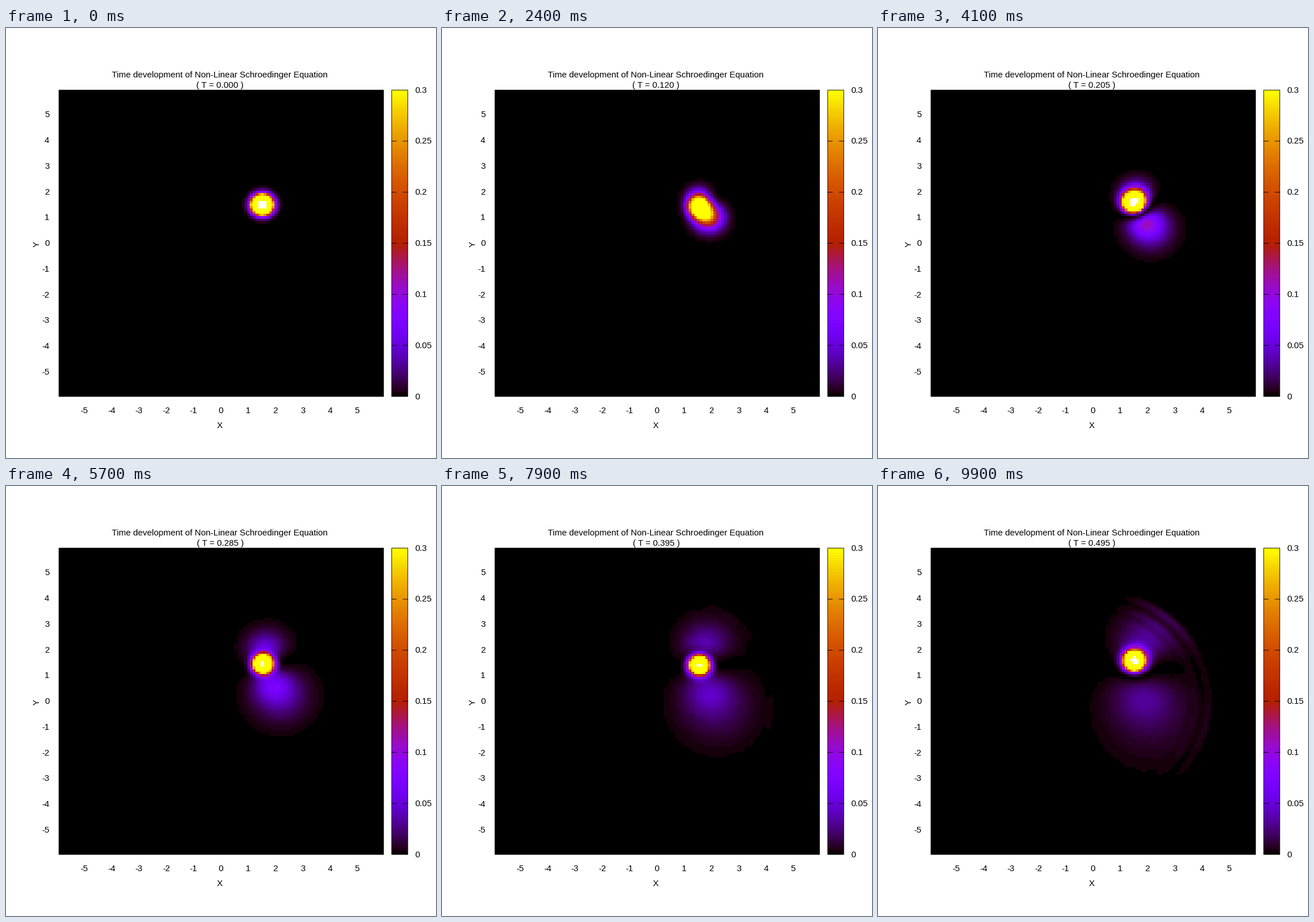
Write a matplotlib script that moves like this. It is 748x748 px and loops after 10 s.

```python
import numpy as np
import matplotlib.pyplot as plt
from matplotlib.animation import FuncAnimation
from matplotlib.patches import Rectangle

SIZE, DPI = 748, 100
FRAMES, DT = 100, 0.005
L, R, TOP, BOT = 92.1, 656.8, 108, 641  # map box
CL, CR = 670.9, 698.9                   # colour bar
HALF, VMAX, CLIP, LEVELS = 5.95, 0.3, 1.0, 128
WALL, K_WALL = 4.45, 6.5                # circular wall, fringe wave number
START = 1.5                             # packet starts at (START, START)
LINE = 0.67

plt.rcParams["font.family"] = "Liberation Sans"

grid = np.linspace(-HALF, HALF, 120)
X, Y = np.meshgrid(grid, grid)
RAD = np.hypot(X, Y)


def palette(v):
    """Black-violet-red-yellow map in discrete levels."""
    i = np.clip(np.floor(np.asarray(v) / VMAX * LEVELS), 0, LEVELS - 1)
    x = i / (LEVELS - 1)
    blue = np.clip(np.sin(2 * np.pi * x), 0, 1)
    return np.stack([np.sqrt(x), x ** 3, blue], axis=-1)


def packet(amp, cx, cy, s2):
    return amp * np.exp(-((X - cx) ** 2 + (Y - cy) ** 2) / (2 * s2))


def lobe(t, dx, dy, mass, rate, wake, wake_rate, lag):
    """Spreading packet displaced by (dx, dy), plus a narrower wake behind it."""
    s2 = 0.08 + rate * t * t
    amp = np.sqrt(mass / (np.pi * s2))
    return (packet(amp, START + dx, START + dy, s2)
            + packet(amp * wake, START + lag * dx, START + lag * dy,
                     0.08 + wake_rate * t * t))


def density(t):
    phase = 21.7 * (t - 0.205)

    # trapped part, wobbling in its well
    settle = 1 - np.exp(-t / 0.05)
    dip = np.exp(-((t - 0.1) / 0.045) ** 2)
    sway = np.cos(phase)
    core = packet(1.16 - 0.35 * dip,
                  START + settle * (0.025 - 0.025 * sway),
                  START + settle * (-0.025 + 0.075 * sway),
                  0.08 + 0.035 * dip)

    # escaping part circling the origin, and an upper lobe of opposite sign
    a = np.radians(45 - t * (158 - 70 * t))
    r = START * np.sqrt(2) * (1 + 0.1 * t)
    down = lobe(t, r * np.cos(a) - START, r * np.sin(a) - START,
                0.1, 10.5, 0.6 + t, 3, 0.45)
    up = lobe(t, 2.2 * t * t, 1.8 * t, 0.06, 5.3, 2 * t, 2, 0.5)
    twist = np.exp(1.5j * np.maximum(RAD - 3, 0))
    out = up - down * twist

    # reflection from the wall
    gap = np.maximum(WALL - RAD, 0)
    back = 0.8 * np.exp(-gap / max(0.05, 2.2 * (t - 0.3)))
    out = out * (RAD < WALL) * (1 - back * np.exp(2j * K_WALL * gap))
    return np.abs(core + out * np.exp(1j * phase)) ** 2


def cell_colors(t):
    d = density(t)
    corners = np.stack([d[:-1, :-1], d[1:, :-1], d[:-1, 1:], d[1:, 1:]])
    rgb = palette(corners.mean(axis=0))
    rgb[corners.min(axis=0) > CLIP] = 1
    return rgb


fig = plt.figure(figsize=(SIZE / DPI, SIZE / DPI), dpi=DPI, facecolor="white")
ax = fig.add_axes([0, 0, 1, 1])


def label(x, y, s, ha="center", va="baseline", **kw):
    return ax.text(x, y, s, ha=ha, va=va, fontsize=10.8, color="black", **kw)


def show(rgb, x0, x1):
    """Image with a soft one-pixel border."""
    ax.add_patch(Rectangle((x0, TOP), x1 - x0, BOT - TOP, fill=False,
                           ec="black", lw=LINE, snap=False, zorder=3))
    return ax.imshow(rgb, extent=(x0, x1, BOT, TOP), origin="lower",
                     interpolation="nearest", aspect="auto")


field = show(cell_colors(0), L, R)
show(palette((np.arange(LEVELS) + 0.5) / LEVELS * VMAX)[:, None, :], CL, CR)

mid_x, mid_y = (L + R) / 2, (TOP + BOT) / 2
for n in range(-5, 6):
    label(mid_x - 0.7 + n * (R - L) / (2 * HALF), 670.5, str(n))
    label(75.5, mid_y + 4.6 - n * (BOT - TOP) / (2 * HALF), str(n), "right")

for n in range(7):
    v = n * 0.05
    y = BOT - (BOT - TOP) * v / VMAX
    label(711.5, y + 4.6, f"{v:.2g}", "left")
    if 0 < n < 6:
        for x in (CL, CR - 8):
            ax.plot([x, x + 8], [y, y], color="black", lw=LINE, snap=False)

label(371.5, 85.7, "Time development of Non-Linear Schroedinger Equation")
clock = label(372.5, 103.7, "")
label(372, 696.5, "X")
label(53.5, 375.5, "Y", va="center", rotation=90)

ax.set_xlim(0, SIZE)
ax.set_ylim(SIZE, 0)
ax.axis("off")


def update(i):
    t = i * DT
    field.set_data(cell_colors(t))
    clock.set_text(f"( T = {t:.3f} )")
    return field, clock


anim = FuncAnimation(fig, update, frames=FRAMES, interval=100,
                     repeat=True, repeat_delay=0, blit=False)
plt.show()
```
